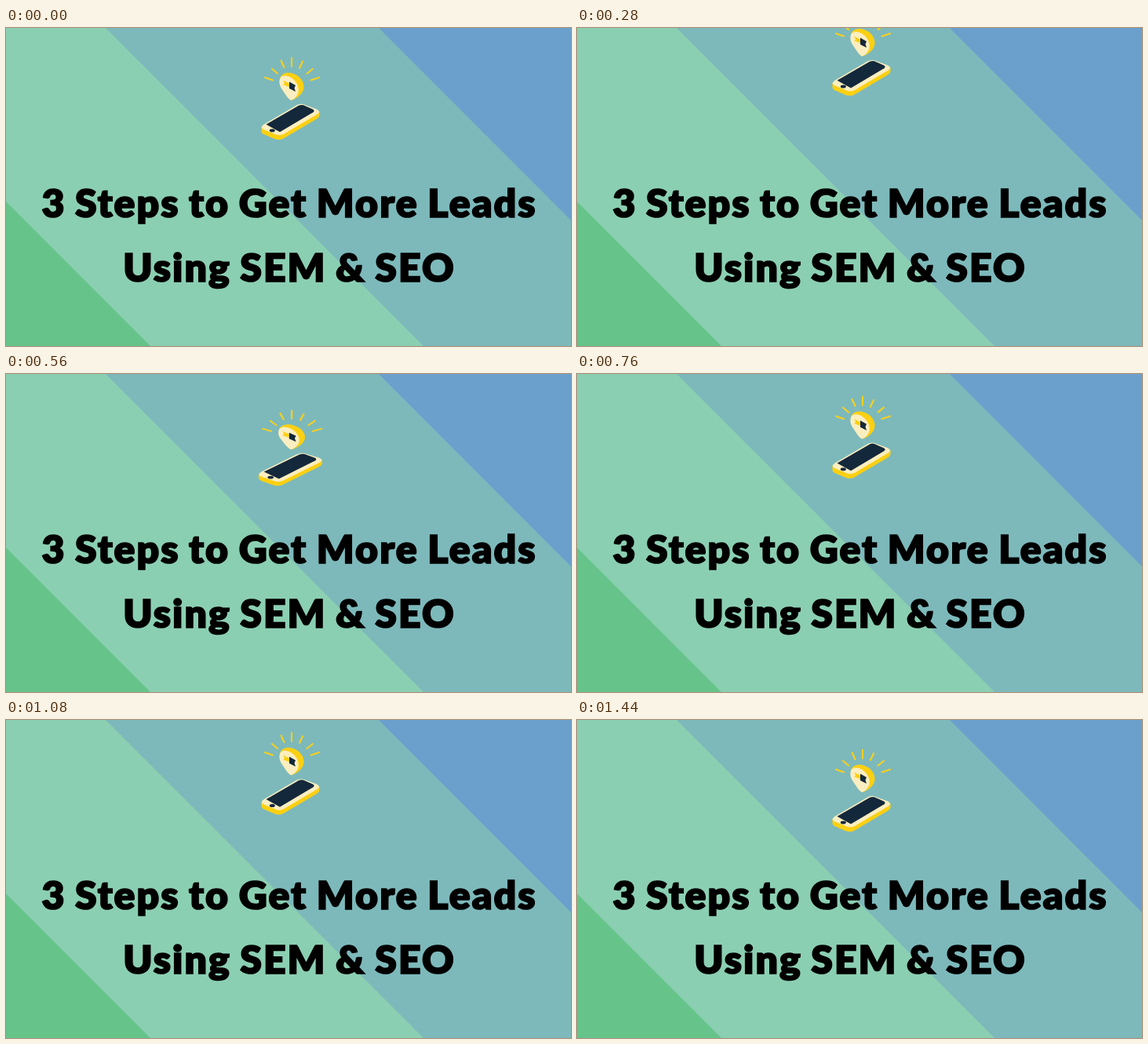
An HTML page that plays this animation: 720 px wide and 405 px high, repeating every 2.16 s.

```html
<!DOCTYPE html>
<html lang="en">
<head>
<meta charset="utf-8">
<title>3 Steps to Get More Leads</title>
<style>
  html, body { margin: 0; width: 100%; height: 100%; overflow: hidden; }
  svg { display: block; width: 100vw; height: 100vh; }
  text {
    font: 900 50px Lato, sans-serif;
    letter-spacing: 2px;
    word-spacing: -2px;
    text-anchor: middle;
    stroke: #000;
    stroke-width: 1.7px;
  }
  .cream { fill: #fbeec0; }
  .gold { fill: #fbd012; }
  .navy { fill: #14283b; }
  .rays { fill: none; stroke: #f8d01c; stroke-width: 2.1; stroke-linecap: round; }
</style>
</head>
<body>
<svg viewBox="0 0 720 405">
  <rect width="720" height="405" fill="#7db9bb"/>
  <path d="M0 0H127L532 405H0Z" fill="#8bcfb2"/>
  <path d="M0 221L184 405H0Z" fill="#66c48b"/>
  <path d="M475 0H720V245Z" fill="#6aa0cb"/>

  <g id="icon">
    <path class="rays" d="M330 63L340 66.5M339 52L346 58M350.5 41.5L354.5 50M364 38V49
      M378 42.5L374 51M391 52L383.5 58M399 63L388.500 66.500"/>
    <!-- pin -->
    <path class="gold" d="M349 65C350 58 357 56 364 57.5C373 59.5 380 67 379.5 76
      C379 83 372 89 364 92Z"/>
    <path class="cream" d="M348.5 67C349.5 60 356 59 363 63C370 67 374 75 372.5 82
      C371 87 367 91 363 92C359 90 355 83 351 77C349 74 348 70 348.5 67Z"/>
    <path class="gold" d="M353 66.5L361 70.5V75L353.5 72.5L355 70Z"/>
    <path class="navy" d="M361 68.5L369 73L367.5 76.5L369 81L361 77Z"/>
    <!-- phone -->
    <path class="gold" d="M325.500 126V131Q325.500 134 329 135.500L343 141.500Q348.500 143.500 353.500 140.700
      L395.500 116Q399.500 113.500 399.500 110.500V106Z"/>
    <path class="cream" d="M329 122.500L370 98.500Q375 95.500 381 98L396 103.500Q401.500 106.500 396.800 109.800
      L354.500 134.800Q349.500 137.800 344 135.800L329 129.500Q322.500 126.500 329 122.500Z"/>
    <path class="navy" d="M331.500 122.800L373 98.800Q376 97.300 379 98.300L391 103.500
      Q394 105.300 391.500 107.300L349 132.500Z"/>
    <ellipse class="navy" cx="339.300" cy="130.600" rx="3.500" ry="2"/>
  </g>

  <text x="361" y="241">3 Steps to Get More Leads</text>
  <text x="361" y="323">Using SEM &amp; SEO</text>
</svg>
<script>
  const LOOP = 2160, STEP = 40, CYCLE = 720, AIR = 472;
  const BASE_X = 362.5, BASE_Y = 143;
  const hops = [{ height: 58, squash: 0.1 }, { height: 30, squash: 0.05 }];
  const icon = document.getElementById('icon');
  const arc = x => 4 * x * (1 - x);

  // Each hop flies, lands and squashes; after two hops the icon rests.
  function pose(t) {
    const hop = hops[Math.floor(t / CYCLE)];
    if (!hop) return { lift: 0, squash: 0 };
    const local = t % CYCLE;
    return local < AIR
      ? { lift: hop.height * arc(local / AIR), squash: 0 }
      : { lift: 0, squash: hop.squash * arc((local - AIR) / (CYCLE - AIR)) };
  }

  function draw(t) {
    const { lift, squash } = pose(Math.floor(t / STEP) * STEP);
    const wide = 1 + squash;
    icon.setAttribute('transform',
      `translate(${BASE_X} ${BASE_Y - lift}) scale(${wide} ${1 / wide}) translate(${-BASE_X} ${-BASE_Y})`);
  }

  const start = performance.now();
  function tick() {
    draw((performance.now() - start) % LOOP);
    requestAnimationFrame(tick);
  }
  tick();
</script>
</body>
</html>
```
